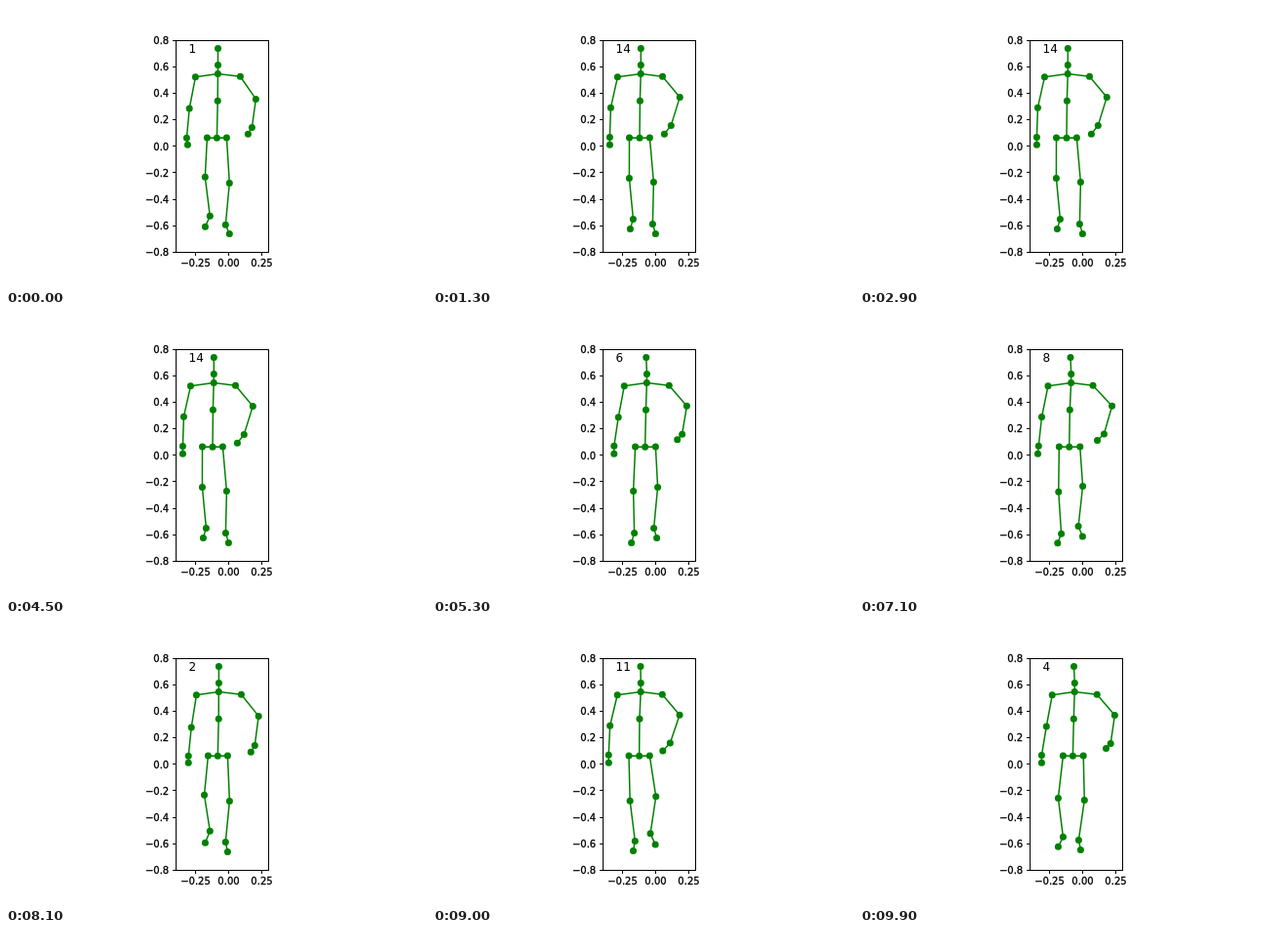
An HTML page for the animation above (10000 ms loop, 432 by 288 pixels).

```html
<!DOCTYPE html>
<html lang="en">
<head>
<meta charset="utf-8">
<title>Walking skeleton plot</title>
<style>
  html, body { margin: 0; width: 100%; height: 100%; overflow: hidden; background: #fff; }
  svg { display: block; width: 432px; height: 288px; }
  text { font: 10px "DejaVu Sans", sans-serif; }
  .tick { stroke: #000; stroke-width: .3; }
  #count { font-size: 12px; }
  #axes { fill: none; stroke: #000; shape-rendering: crispEdges; }
  #bones { fill: none; stroke: #008000; stroke-width: 1.5; stroke-linejoin: round; }
  #dots { fill: #008000; }
</style>
</head>
<body>
<svg viewBox="0 0 432 288">
  <path id="axes"/>
  <g id="labels"></g>
  <path id="bones"/>
  <g id="dots"></g>
  <text id="count" x="187.6" y="48.3"></text>
</svg>
<script>
const STEP = 100, LOOP = 10000, CYCLE = 16, HALF = CYCLE / 2;
const KEYS = [0, 1, 3, 13];   // steps of the walk cycle at which joints are listed
const AXIS = 216;             // mirror line for the legs

// Each joint: x at the key steps, y (fixed, or at the key steps), opposite joint
const joints = {
  head:      { x: [217.5, 218.4, 219.5, 213.3], y: 43.4 },
  neck:      { x: [217.5, 218.4, 220.3, 213.3], y: 60.6 },
  chest:     { x: [217.4, 218.3, 220.2, 213.2], y: 69.4 },
  spine:     { x: [217.2, 218.2, 219.3, 212.4], y: 97.2 },
  pelvis:    { x: [216.4, 217.3, 218.4, 212], y: 135.2 },
  shoulderL: { x: [194.4, 195.4, 197.2, 189.4], y: 72.8 },
  elbowL:    { x: [188.2, 190.2, 191.3, 182.4], y: [105, 106, 105, 104.2] },
  wristL:    { x: [185.4, 187.2, 186.4, 181.4], y: [135.3, 135.3, 134.4, 134.4] },
  handL:     { x: [186.4, 187.2, 186.4, 181.4], y: 142.3 },
  shoulderR: { x: [240.4, 241.4, 243.2, 235.5], y: 72.3 },
  elbowR:    { x: [256.4, 259.2, 261.4, 253.3], y: [95.4, 94.4, 93.5, 93.4] },
  wristR:    { x: [252.4, 255.3, 257.2, 244.3], y: [124.5, 124.4, 122.4, 122.4] },
  handR:     { x: [248.4, 251.3, 252.5, 237.4], y: [131.3, 131.3, 127.4, 131.3] },
  hipL:      { x: [206.4, 207.4, 208.4, 201.5], y: 135.1 },
  hipR:      { x: [226.4, 227.4, 229.2, 222.4], y: 135.1 },
  kneeL:     { x: [204.3, 203.5, 203.4, 201.4], y: [175.3, 175.3, 178.4, 176.4], opposite: "kneeR" },
  ankleL:    { x: [209.3, 209.3, 208.4, 205.4], y: [215.3, 212.3, 218.3, 218.4], opposite: "ankleR" },
  footL:     { x: [204.4, 204.4, 203.4, 202.4], y: [226.3, 224.3, 228.3, 228.4], opposite: "footR" },
  kneeR:     { x: [229.3, 229.4, 230.3, 226.4], y: [181.4, 181.4, 180.4, 180.5], opposite: "kneeL" },
  ankleR:    { x: [225.3, 225.3, 224.4, 225.4], y: [224.3, 223.4, 221.4, 223.4], opposite: "ankleL" },
  footR:     { x: [229.3, 227.4, 226.4, 228.4], y: [233.4, 233.4, 231.4, 233.4], opposite: "footL" }
};

const chains = [
  "head neck chest spine pelvis",
  "chest shoulderL elbowL wristL handL",
  "chest shoulderR elbowR wristR handR",
  "pelvis hipL kneeL ankleL footL",
  "pelvis hipR kneeR ankleR footR"
].map(chain => chain.split(" "));

const $ = id => document.getElementById(id);
function add(parent, tag, attrs, text = "") {
  const node = document.createElementNS("http://www.w3.org/2000/svg", tag);
  for (const name in attrs) node.setAttribute(name, attrs[name]);
  node.textContent = text;
  return parent.appendChild(node);
}

const keyed = values => KEYS.map((step, i) => [step, values[i]]);
const halfCycleLater = values => KEYS.map((step, i) => [(step + HALF) % CYCLE, values[i]]);

// Smooth periodic curve through [step, value] points
function curve(points) {
  points.sort((a, b) => a[0] - b[0]);
  const n = points.length;
  const at = i => {
    const wrap = Math.floor(i / n), [step, value] = points[i - wrap * n];
    return [step + wrap * CYCLE, value];
  };
  const slope = i => {
    const [s0, v0] = at(i - 1), [s1, v1] = at(i + 1);
    return (v1 - v0) / (s1 - s0);
  };
  return step => {
    let i = n - 1;
    while (i >= 0 && points[i][0] > step) i--;
    const [s0, v0] = at(i), [s1, v1] = at(i + 1), gap = s1 - s0, u = (step - s0) / gap;
    const ease = u * u * (3 - 2 * u);
    return v0 + (v1 - v0) * ease
      + gap * u * (1 - u) * (slope(i) * (1 - u) - slope(i + 1) * u);
  };
}

// Legs repeat the opposite leg half a cycle later; the upper body sways back
function curveX({ x, opposite }) {
  const middle = x[3] + .44 * (x[2] - x[3]);
  const later = opposite
    ? joints[opposite].x.map(v => 2 * AXIS - v)
    : x.map(v => 2 * middle - v);
  return curve([...keyed(x), ...halfCycleLater(later)]);
}
function curveY({ y, opposite }) {
  if (!Array.isArray(y)) return () => y;
  return curve([...keyed(y), ...(opposite ? halfCycleLater(joints[opposite].y) : [])]);
}

for (const joint of Object.values(joints)) {
  joint.atX = curveX(joint);
  joint.atY = curveY(joint);
  joint.dot = add($("dots"), "circle", { r: 3.5 });
}

function drawAxes() {
  let d = "M174.5 35.5H269.5V252.5H174.5Z";
  const number = (v, digits) => v.toFixed(digits).replace("-", "\u2212");
  for (let i = 0; i <= 8; i++) {
    const y = 35.3 + i * 27.12;
    d += `M171 ${Math.floor(y) + .5}H174.5`;
    add($("labels"), "text", { class: "tick", x: 167.2, y: y + 3.8, "text-anchor": "end" },
      number((4 - i) / 5, 1));
  }
  for (let i = -1; i <= 1; i++) {
    const x = 228.5 + i * 34;
    d += `M${x} 252.5V256`;
    add($("labels"), "text", { class: "tick", x, y: 267.3, "text-anchor": "middle" },
      number(i / 4, 2));
  }
  $("axes").setAttribute("d", d);
}

function draw(time) {
  const step = Math.floor((time % LOOP) / STEP) % CYCLE;
  for (const joint of Object.values(joints)) {
    joint.point = [joint.atX(step), joint.atY(step)];
    joint.dot.setAttribute("cx", joint.point[0]);
    joint.dot.setAttribute("cy", joint.point[1]);
  }
  $("bones").setAttribute("d",
    chains.map(chain => "M" + chain.map(name => joints[name].point.join(" ")).join("L")).join(""));
  $("count").textContent = step + 1;
}

drawAxes();
draw(0);
let start;
requestAnimationFrame(function tick(now) {
  start ??= now;
  draw(now - start);
  requestAnimationFrame(tick);
});
</script>
</body>
</html>
```
